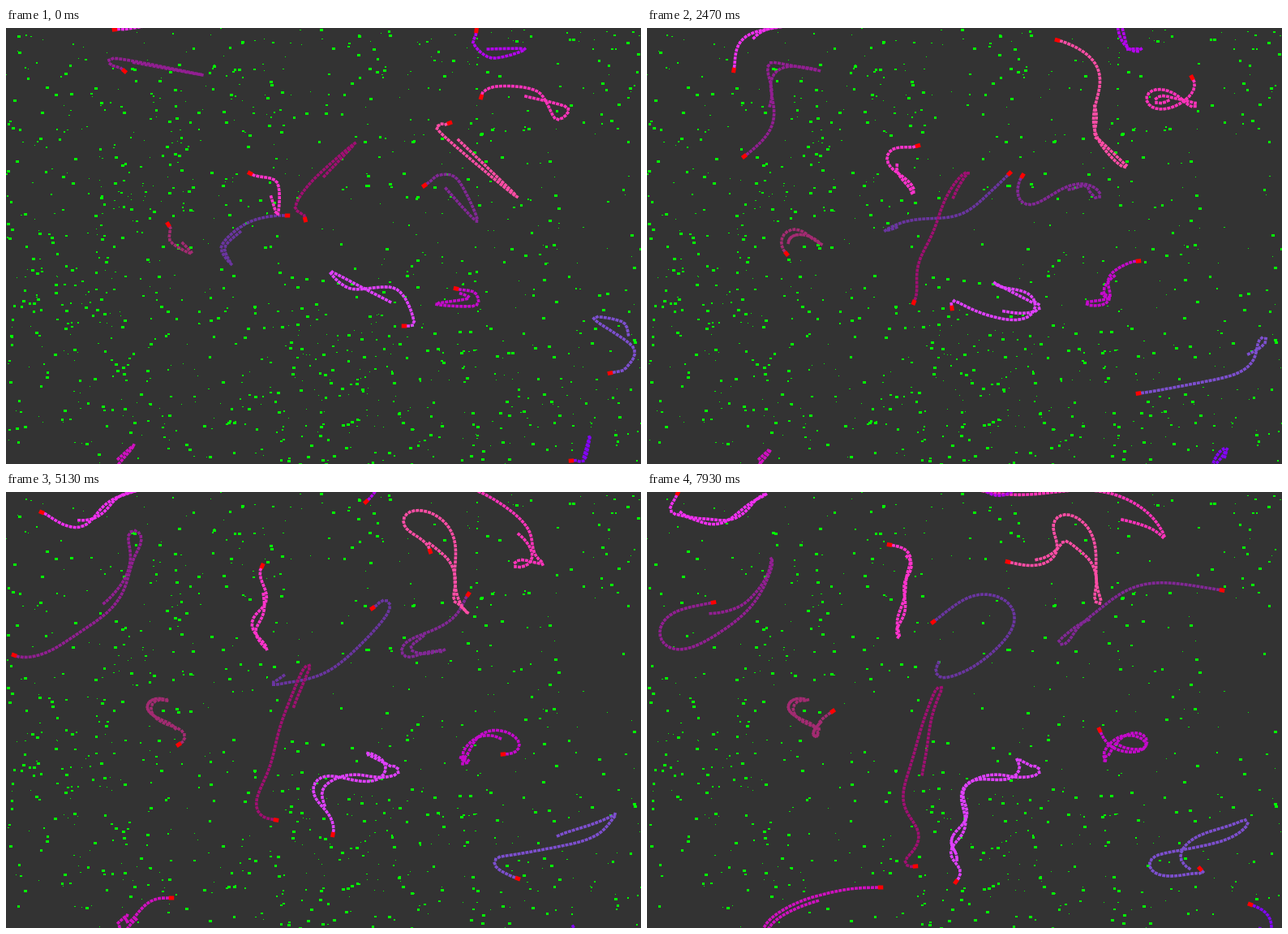
An HTML page with a canvas that plays this animation: 783x537 px, repeating every 8000 ms.

```html
<!DOCTYPE html>
<html lang="en">
<head>
<meta charset="utf-8">
<title>Worms</title>
<style>
html, body { margin: 0; width: 100%; height: 100%; overflow: hidden; background: #333; }
canvas { display: block; }
</style>
</head>
<body>
<canvas id="stage" width="783" height="537"></canvas>
<script>
const W = 783, H = 537, LOOP = 8000, FRAMES = 115;
const LINK = 5, APPETITE = 0.5, STEPS = 14;
const LEG_ENDS = [0, 17, 36, 62, 74, 89, 114];
const ctx = document.getElementById('stage').getContext('2d');

let seed = 20417;
function rand() {
  seed = (seed * 1664525 + 1013904223) >>> 0;
  return seed / 4294967296;
}

const parse = text => text.trim().split(/\s+/).map(p => p.split(',').map(Number));
const gap = (a, b) => Math.hypot(a[0] - b[0], a[1] - b[1]);
const mix = (a, b, k) => [a[0] + (b[0] - a[0]) * k, a[1] + (b[1] - a[1]) * k];

// Food density: an even spread with a few rich (+) and bare (-) patches
const patches = [
  { x: 190, y: 180, r: 85, w: 0.5 },
  { x: 70, y: 360, r: 100, w: 0.4 },
  { x: 400, y: 440, r: 110, w: 0.5 },
  { x: 590, y: 430, r: 80, w: 0.2 },
  { x: 380, y: 240, r: 95, w: -0.35 },
  { x: 690, y: 230, r: 120, w: -0.25 }
];
const density = (x, y) => patches.reduce(
  (sum, p) => sum + p.w * Math.exp(-((x - p.x) ** 2 + (y - p.y) ** 2) / p.r ** 2), 0.5);

// Catmull-Rom curve, STEPS samples per span
function smooth(pts) {
  const out = [pts[0]];
  for (let i = 0; i < pts.length - 1; i++) {
    const a = pts[Math.max(i - 1, 0)], b = pts[i], c = pts[i + 1];
    const d = pts[Math.min(i + 2, pts.length - 1)];
    for (let s = 1; s <= STEPS; s++) {
      const t = s / STEPS;
      out.push([0, 1].map(k => b[k] + 0.5 * t * (c[k] - a[k]
        + t * (2 * a[k] - 5 * b[k] + 4 * c[k] - d[k]
        + t * (3 * (b[k] - c[k]) + d[k] - a[k])))));
    }
  }
  return out;
}

function lengthOf(line) {
  let sum = 0;
  for (let i = 1; i < line.length; i++) sum += gap(line[i - 1], line[i]);
  return sum;
}

function along(line, dist) {
  for (let i = 1; i < line.length; i++) {
    const g = gap(line[i - 1], line[i]);
    if (dist <= g && g > 0) return mix(line[i - 1], line[i], dist / g);
    dist -= g;
  }
  return line[line.length - 1];
}

// The route is the trail already crawled, then one leg per entry of LEG_ENDS
function worm(color, route) {
  const parts = route.split('|').map(parse);
  const curve = smooth(parts.flat());
  let from = (parts[0].length - 1) * STEPS;

  const trail = curve.slice(0, from + 1).reverse(), body = [];
  for (let s = 0, len = lengthOf(trail); s <= len; s += LINK) body.push(along(trail, s));

  const track = [];
  parts.slice(1).forEach((leg, n) => {
    const to = from + leg.length * STEPS;
    const part = curve.slice(from, to + 1), len = lengthOf(part);
    const f0 = LEG_ENDS[n], f1 = LEG_ENDS[n + 1];
    for (let f = f0; f <= f1; f++) track[f] = along(part, len * (f - f0) / (f1 - f0));
    from = to;
  });
  return { color, poses: crawl(body, track) };
}

// Every link is dragged by the one before; where food is rich the tail
// grows faster, reaching for a point that trails the head
function crawl(body, track) {
  let lag = body[Math.min(9, body.length - 1)], meal = 0;
  return track.map(head => {
    body[0] = head;
    for (let i = 1; i < body.length; i++) {
      const g = gap(body[i - 1], body[i]);
      if (g > LINK) body[i] = mix(body[i - 1], body[i], LINK / g);
    }
    lag = mix(lag, head, 0.06);
    meal += APPETITE * density(...head);
    if (meal >= 1) {
      const tail = body[body.length - 1], g = gap(tail, lag);
      body.push(g > LINK ? mix(tail, lag, LINK / g) : lag);
      meal--;
    }
    return body.slice();
  });
}

const worms = [
  worm('#921f92', '155,42 243,58 140,38 129,45 146,53 | 152,80 165,107 | 155,127 120,158 | 98,165 55,198 | 10,201 | 12,155 | 82,136'),
  worm('#6a35a0', '290,250 270,270 278,291 266,268 300,239 347,231 | 387,243 399,225 | 447,179 | 480,137 466,125 | 452,143 | 416,117 | 353,160'),
  worm('#a00f72', '392,183 430,142 378,188 357,220 369,236 | 345,268 330,289 | 334,322 329,338 | 303,385 | 312,402 333,404 | 347,422 335,437 | 309,462 331,461'),
  worm('#ff33cc', '326,205 335,230 334,190 301,179 | 283,151 | 300,145 334,145 | 313,108 | 316,91 | 334,92 | 328,72 299,65'),
  worm('#a32b72', '217,264 229,278 203,263 200,242 | 165,250 | 172,278 | 225,295 | 213,311 | 200,297 | 208,285 229,270'),
  worm('#822896', '540,195 581,238 558,188 535,181 516,194 | 462,228 | 455,207 463,182 | 490,184 553,158 | 570,126 | 616,109 | 709,121'),
  worm('#ff4da6', '557,137 630,208 540,133 535,119 547,117 | 550,95 568,52 | 506,15 | 470,42 502,50 | 523,73 | 485,92 | 445,86'),
  worm('#ff33bb', '640,84 692,98 678,112 655,78 605,72 586,85 | 610,104 642,104 | 675,80 672,61 | 620,20 570,-8 | 530,-4 | 458,5 | 390,-6'),
  worm('#b405ee', '593,26 640,26 600,37 577,20 580,3 | 577,-40 | 550,-60 | 480,-30 | 444,12 | 415,0 | 395,-30'),
  worm('#e040ff', '475,338 440,320 400,300 425,321 480,321 502,357 491,367 | 419,355 | 372,332 376,345 | 367,378 394,386 | 403,422 | 356,443 | 391,462 381,480'),
  worm('#c40acb', '558,326 570,333 530,340 578,342 578,326 555,321 | 548,313 570,302 | 606,287 | 644,316 | 613,323 | 573,317 | 558,293'),
  worm('#7d4fcf', '768,380 760,362 725,358 773,393 765,418 745,425 | 685,436 | 606,450 | 568,447 590,455 | 631,476 | 674,469 | 692,470 682,464'),
  worm('#8205f5', '712,530 720,502 713,532 697,533 | 690,548 | 695,575 | 740,575 | 770,555 | 771,522 | 744,508'),
  worm('#d010c0', '138,531 158,514 130,548 120,565 | 125,575 | 140,560 | 150,535 177,501 | 204,500 | 242,489 | 288,487'),
  worm('#f030f0', '165,-8 215,-10 150,1 134,2 | 111,13 | 107,52 | 92,50 61,36 | 44,25 | 8,31 | 28,20 38,1')
];

// Food vanishes when a head reaches it, and some of it at random
const food = [];
while (food.length < 1150) {
  const x = Math.floor(rand() * W), y = Math.floor(rand() * H);
  if (rand() > density(x, y)) continue;
  const w = 1 + Math.floor(rand() * 4);
  const h = Math.min(3, Math.max(1, w - Math.floor(rand() * 2)));
  let end = rand() < 0.3 ? rand() * FRAMES : FRAMES;
  for (const { poses } of worms) {
    const hit = poses.findIndex(p => gap(p[0], [x, y]) < 6);
    if (hit >= 0) end = Math.min(end, hit);
  }
  food.push({ x, y, w, h, end });
}

function block(p, toward, w, h) {
  const a = Math.atan2(toward[1] - p[1], toward[0] - p[0]);
  const c = Math.cos(a), s = Math.sin(a);
  ctx.setTransform(c, s, -s, c, p[0], p[1]);
  ctx.fillRect(-w / 2, -h / 2, w, h);
}

function draw(f) {
  ctx.setTransform(1, 0, 0, 1, 0, 0);
  ctx.fillStyle = '#333';
  ctx.fillRect(0, 0, W, H);
  ctx.fillStyle = '#0f0';
  for (const d of food) if (f < d.end) ctx.fillRect(d.x, d.y, d.w, d.h);
  for (const { color, poses } of worms) {
    const pts = poses[f];
    ctx.fillStyle = color;
    for (let i = 1; i < pts.length; i++) block(pts[i], pts[i - 1], 4, 3.6);
    ctx.fillStyle = '#f00';
    block(pts[0], pts[1], 6.5, 5);
  }
}

const begin = performance.now();
function tick() {
  const t = (performance.now() - begin) % LOOP;
  draw(Math.min(FRAMES - 1, Math.round(t / LOOP * FRAMES)));
  requestAnimationFrame(tick);
}
tick();
</script>
</body>
</html>
```
